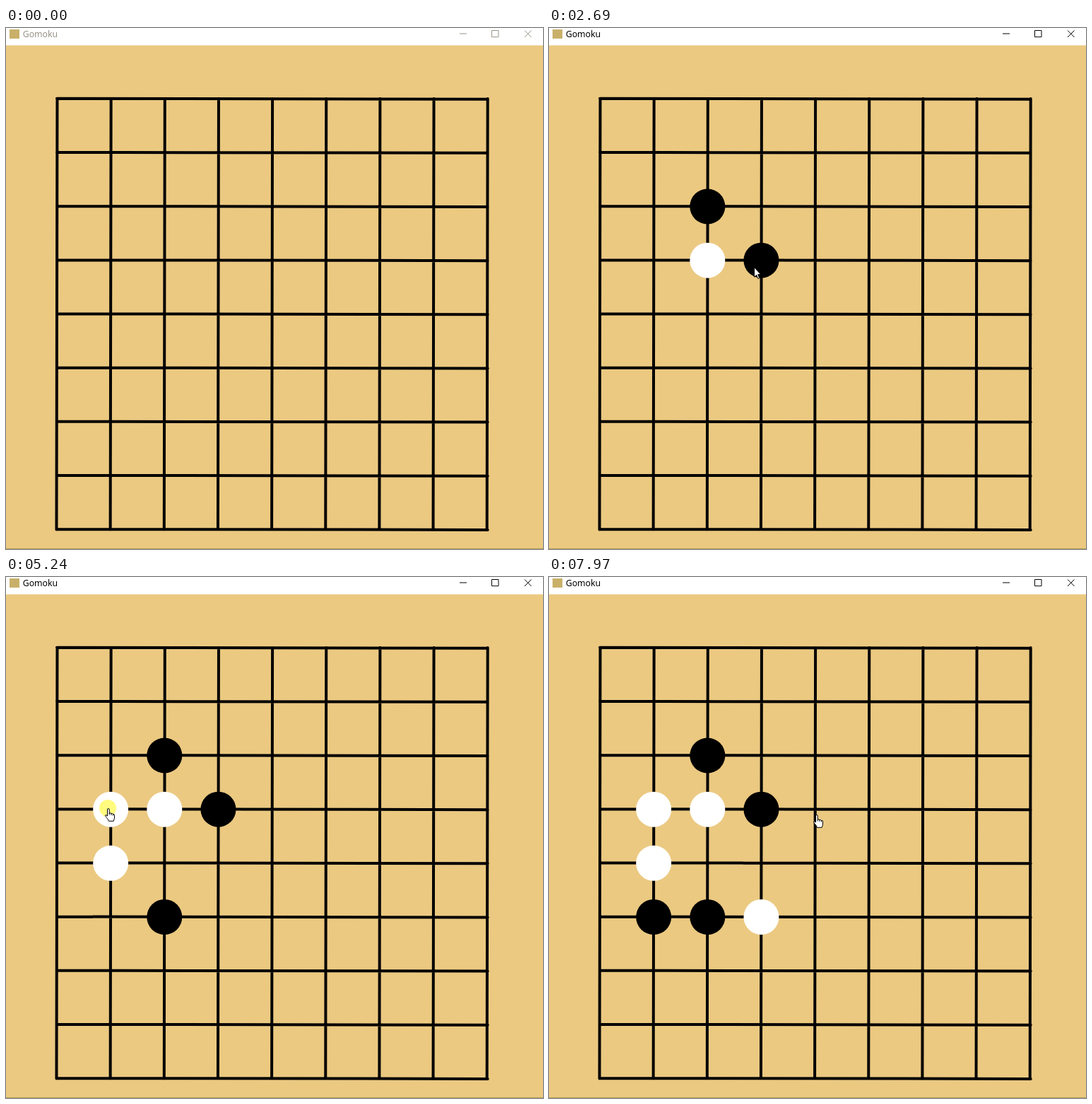
Recreate the animation shown at these times as an HTML page. Size 760 by 737 pixels, loop 8000 ms.

```html
<!DOCTYPE html>
<html lang="en">
<head>
<meta charset="utf-8">
<title>Gomoku</title>
<style>
html, body { margin: 0; width: 100%; height: 100%; overflow: hidden; background: #ebc981; }
svg { display: block; width: 100vw; height: 100vh; }
text { font: 12.3px "Noto Sans", "Open Sans", sans-serif; }
#bar { color: #000; }
#bar.idle { color: #999387; }
#grid { filter: blur(.5px); }
.pointer path { fill: #fff; stroke: #000; stroke-width: 1; stroke-linejoin: round; }
</style>
</head>
<body>
<svg viewBox="0 0 760 737">
  <rect width="760" height="737" fill="#ebc981"/>
  <rect width="760" height="24.5" fill="#fff"/>
  <rect y="736" width="760" height="1" fill="#b39a55"/>
  <rect x="5" y="2" width="14" height="13" fill="#c9b06a"/>
  <g id="bar">
    <text x="23.7" y="12.6" fill="currentColor">Gomoku</text>
    <path d="M642 8H652M687.5 3.5H697V12.7H687.5ZM734 3.5L743.5 13M743.5 3.5L734 13" fill="none" stroke="currentColor"/>
  </g>
  <path id="grid" fill="none" stroke="#000" stroke-width="4" stroke-linecap="round"/>
  <g id="stones"></g>
  <circle id="glow" r="12" fill="#fff800" fill-opacity=".5"/>
  <g id="arrow" class="pointer">
    <path d="M.5 .5V14.3L3.6 11.4L5.8 16.6L7.8 15.7L5.7 10.7H9.8Z"/>
  </g>
  <g id="hand" class="pointer">
    <path d="M-.5 2Q-.5 .5 .8 .5Q2.2 .5 2.2 2V7Q4.5 6.3 5 7.7Q7 7 7.5 8.4Q9.5 8 9.5 10V13Q9.5 15 8.2 18.3H1.3Q1 16.3 -1.4 13.6Q-4 10.8 -3.3 10Q-2.2 9 -.5 11Z"/>
    <path d="M2.2 7V9.5M5 7.7V10M7.5 8.4V10.5"/>
  </g>
</svg>
<script>
const LOOP = 8000, CELL = 76.15, LEFT = 72, TOP = 100.2;
const FIRST = 120, STEP = 77.7;   // the screen updates in even ticks
const REST = 2;                   // ticks the pointer rests around a click

const $ = id => document.getElementById(id);
const nodeX = i => LEFT + CELL * i;
const nodeY = j => TOP + CELL * j;

// Column, row, tick of the click, pointer offset; black plays first
const MOVES = [
  [2, 2, 10, -8, -8], [2, 3, 17, 3, 5], [3, 3, 30, 5, -8], [1, 4, 43, 4, 5],
  [2, 5, 52, -1, -7], [1, 3, 66, -4, -2], [1, 5, 75, 0, 5], [3, 5, 88, 3, -2]
].map(([col, row, at, dx, dy]) => ({ col, row, at, x: nodeX(col) + dx, y: nodeY(row) + dy }));

// Turning points between the clicks: tick, x, y
const TURNS = [
  [0, 591, 624], [5, 181, 207], [24, 321, 290], [36, 205, 434],
  [71, 148, 508], [81, 350, 535], [99, 386, 313], [101, 378, 336]
];

const path = MOVES
  .flatMap(m => [[m.at - REST, m.x, m.y], [m.at + REST, m.x, m.y]])
  .concat(TURNS)
  .sort((a, b) => a[0] - b[0]);

let lines = "";
for (let i = 0; i < 9; i++) {
  const x = nodeX(i), y = nodeY(i);
  lines += `M${x + .5} ${TOP - .2}L${x - .5} ${TOP + 8 * CELL}`;
  lines += `M${LEFT} ${y - .5}L${LEFT + 8 * CELL + .5} ${y + .5}`;
}
$("grid").setAttribute("d", lines);

const stones = MOVES.map((m, n) => {
  const c = document.createElementNS("http://www.w3.org/2000/svg", "circle");
  const attrs = { cx: nodeX(m.col), cy: nodeY(m.row), r: 25, fill: n % 2 ? "#fff" : "#000" };
  for (const k in attrs) c.setAttribute(k, attrs[k]);
  return $("stones").appendChild(c);
});

function pointerAt(tick) {
  const n = path.findIndex(p => p[0] > tick);
  if (n < 1) return path.at(n).slice(1);
  const [t0, x0, y0] = path[n - 1], [t1, x1, y1] = path[n];
  const u = (tick - t0) / (t1 - t0), e = u * u * (3 - 2 * u);
  return [x0 + (x1 - x0) * e, y0 + (y1 - y0) * e];
}

// A hand marks a free node, and lasts until the pointer leaves a new stone
function isHand(x, y, tick) {
  const i = Math.round((x - LEFT) / CELL), j = Math.round((y - TOP) / CELL);
  const near = Math.max(Math.abs(x - nodeX(i)), Math.abs(y - nodeY(j))) < 10.5;
  return near && !MOVES.some(m => m.col === i && m.row === j && tick > m.at + REST);
}

function show(el, on) {
  el.style.display = on ? "" : "none";
}

function draw(time) {
  const tick = Math.floor((time - FIRST) / STEP + .25);
  const [x, y] = pointerAt(Math.max(0, tick));
  const hand = isHand(x, y, tick);
  $("bar").setAttribute("class", tick < MOVES[0].at ? "idle" : "");
  stones.forEach((s, n) => show(s, tick >= MOVES[n].at));
  for (const id of ["glow", "arrow", "hand"])
    $(id).setAttribute("transform", `translate(${Math.round(x)} ${Math.round(y)})`);
  show($("glow"), MOVES.some(m => tick === m.at));
  show($("arrow"), tick >= 0 && !hand);
  show($("hand"), tick >= 0 && hand);
}

const begin = performance.now();
function loop() {
  draw((performance.now() - begin) % LOOP);
  requestAnimationFrame(loop);
}
loop();
</script>
</body>
</html>
```
